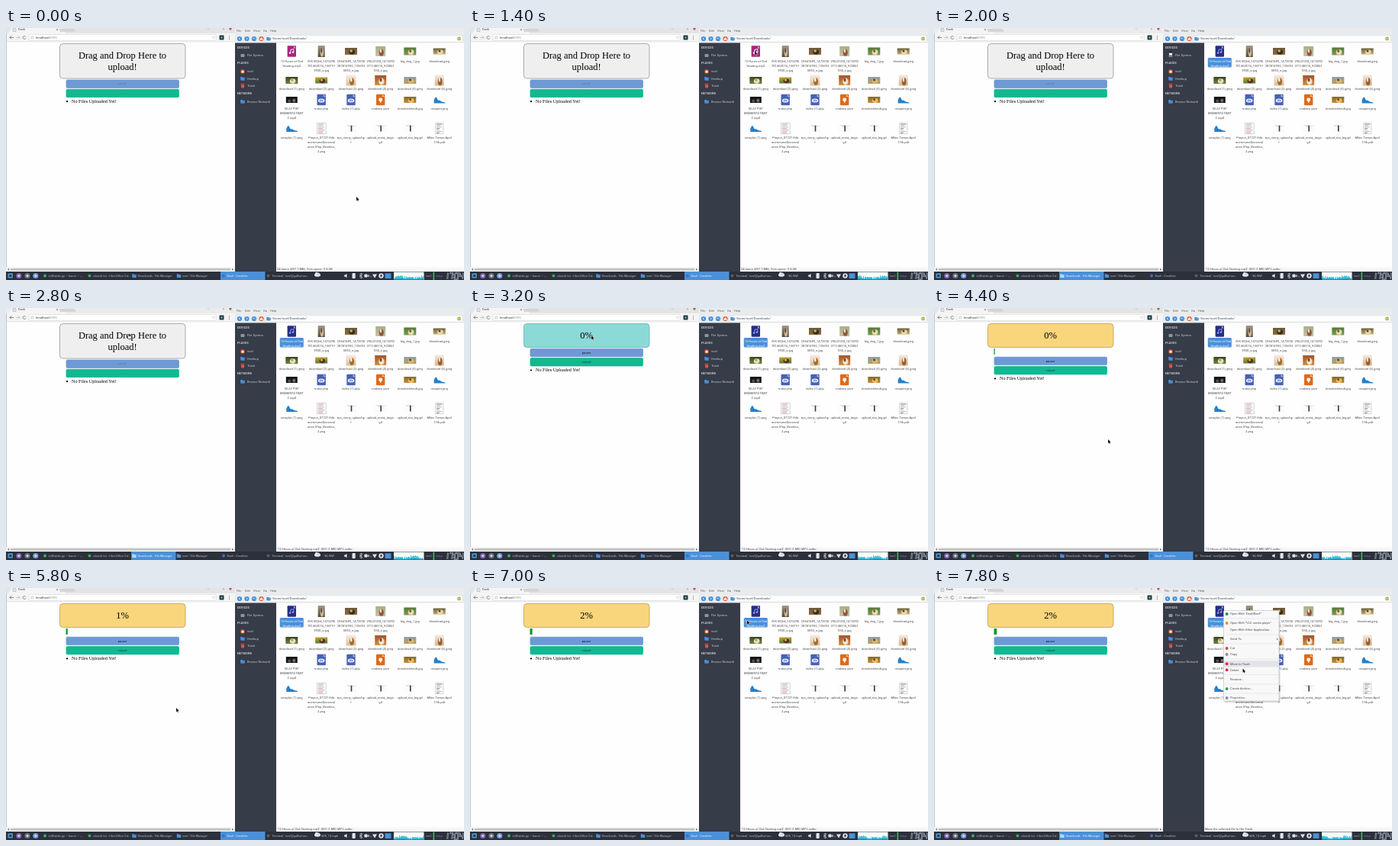
An HTML page with a canvas that plays this animation: 600x330 px, repeating every 8000 ms.

```html
<!DOCTYPE html>
<html lang="en">
<head>
<meta charset="utf-8">
<title>Drag and drop upload</title>
<style>
html, body { margin: 0; width: 100%; height: 100%; overflow: hidden; background: #fefefe; }
canvas { display: block; width: 600px; height: 330px; }
</style>
</head>
<body>
<canvas id="stage" width="600" height="330"></canvas>
<script>
const ctx = document.getElementById('stage').getContext('2d');
const LOOP = 8000;
const UI = 'Roboto, sans-serif', SERIF = '"Liberation Serif", serif', ARIAL = '"Liberation Sans", sans-serif';
const USER = 'noel', SONG = '12 Hours of Owl Hooting.mp3';

// Moments of the story, in ms
const SELECT = 1500, DROP = 3000, UPLOAD = 3500, MENU = 7300, HOVER = 7600;
const CURSOR = [
  [0, 459, 221], [200, 459, 221], [1200, 373, 30], [1600, 373, 30], [2700, 162, 36],
  [3000, 159, 36], [3300, 159, 36], [4200, 228, 172], [5000, 228, 172], [5700, 223, 157],
  [6200, 223, 157], [7200, 379, 29], [7400, 379, 29], [7800, 404.5, 105.5], [8000, 404.5, 105.5]
];

function box(x, y, w, h, fill, radius = 0, stroke) {
  ctx.beginPath();
  ctx.roundRect(x, y, w, h, radius);
  if (fill) { ctx.fillStyle = fill; ctx.fill(); }
  if (stroke) { ctx.strokeStyle = stroke; ctx.lineWidth = 0.7; ctx.stroke(); }
}
function oval(x, y, rx, ry, fill) {
  ctx.fillStyle = fill;
  ctx.beginPath();
  ctx.ellipse(x, y, rx, ry, 0, 0, 7);
  ctx.fill();
}
const dot = (x, y, r, fill) => oval(x, y, r, r, fill);
function shape(points, fill) {
  ctx.fillStyle = fill;
  ctx.beginPath();
  points.forEach(([x, y]) => ctx.lineTo(x, y));
  ctx.fill();
}
function line(points, color, width = 0.7) {
  ctx.strokeStyle = color;
  ctx.lineWidth = width;
  ctx.beginPath();
  points.forEach(([x, y]) => ctx.lineTo(x, y));
  ctx.stroke();
}
function folder(x, y, color = '#4a90d9') {
  box(x - 2.7, y - 2.3, 2.6, 2, color, 0.5);
  box(x - 2.7, y - 1.6, 5.4, 4, color, 0.6);
}
// y is the visual middle of the line
function text(string, x, y, color, size = 4.1, align = 'left', font = UI, weight = '') {
  ctx.font = `${weight} ${size}px ${font}`;
  ctx.textAlign = align;
  ctx.fillStyle = color;
  ctx.fillText(string, x, y + size * 0.34);
}
const noise = n => { const v = Math.sin(n * 127.1 + 3) * 43758.5; return v - Math.floor(v); };

function cursorAt(t) {
  const i = CURSOR.findIndex(k => k[0] > t);
  const [t0, x0, y0] = CURSOR[i - 1], [t1, x1, y1] = CURSOR[i];
  const p = (t - t0) / (t1 - t0), e = p * p * (3 - 2 * p);
  return [x0 + (x1 - x0) * e, y0 + (y1 - y0) * e];
}

/* ---------- browser ---------- */
function drawBrowser(t, focused) {
  box(0, 0, 300, 319, '#fefefe');
  box(0, 0, 300, 7, focused ? '#e2e4e6' : '#e9ebec');
  shape([[3, 7], [7, 0], [74, 0], [78, 7]], '#f4f4f4');
  shape([[71, 5], [69, 1], [89, 1], [92, 5]], '#d2d4d6');
  box(9, 0.5, 4, 4, '#e4e7ea', 0.5, '#a8b0b8');
  text('Dash', 16, 2, '#444');
  text('×', 67, 2, '#666', 5, 'center');
  text('–', 265, 1.5, '#999', 5, 'center');
  text('×', 285, 1.5, '#999', 5, 'center');
  dot(294, 1, 1.7, '#cc575d');
  box(0, 7, 300, 11, '#f4f4f4');
  line([[0, 18], [300, 18]], '#dcdcdc');
  line([[10, 12.5], [5, 12.5], [7, 10.5], [5, 12.5], [7, 14.5]], '#666');
  line([[13, 12.5], [18, 12.5], [16, 10.5], [18, 12.5], [16, 14.5]], '#bbb');
  ctx.beginPath(); ctx.arc(24, 12.5, 2, 0.4, 5.6); ctx.strokeStyle = '#666'; ctx.stroke();
  box(30, 8.5, 245, 8, '#fff', 1, '#dedede');
  ctx.beginPath(); ctx.arc(34.5, 12.5, 1.6, 0, 7); ctx.strokeStyle = '#888'; ctx.lineWidth = 0.5; ctx.stroke();
  text('localhost', 39, 12.5, '#333', 4.3);
  text(':8050', 56, 12.5, '#999', 4.3);
  text('☆', 272, 12.5, '#777', 5, 'center');
  box(279.5, 9.5, 6, 6, '#223642', 1);
  dot(282.5, 12.5, 1.3, '#69b5ad');
  for (const y of [10.5, 12.5, 14.5]) dot(292.5, y, 0.6, '#666');
  drawUploader(t);
  line([[0.3, 7], [0.3, 318]], '#8c8f94', 0.6);
  box(0, 313.5, 300, 5.5, '#f1f1f1');
  box(6, 314.8, 288, 2.6, '#c1c1c1');
  shape([[2, 316], [4, 314.6], [4, 317.4]], '#777');
  shape([[298, 316], [296, 314.6], [296, 317.4]], '#777');
}

function button(y, label, fill, border, color) {
  box(79, y, 147.5, 10.4, fill, 1.5, border);
  text(label, 152.5, y + 4.9, color, 4.2, 'center', ARIAL);
}

function drawUploader(t) {
  const started = t >= DROP, running = t >= UPLOAD;
  const percent = (t - 2700) / 2000;
  const title = (s, y) => text(s, 152.5, y, '#000', 12.5, 'center', SERIF);
  if (!started) {
    box(70.5, 20.5, 164.5, 45.6, '#efefef', 4, '#8a8a8a');
    title('Drag and Drop Here to', 36);
    title('upload!', 50.6);
  } else {
    box(70.5, 20.5, 164.5, 31, running ? '#f9d57c' : '#8bdad8', 4, running ? '#b69245' : '#5aa9a6');
    title((running ? Math.floor(percent) : 0) + '%', 36);
  }
  if (running) box(78.5, 53, percent * 1.48, 8, '#119a20');
  const top = running ? 64.2 : started ? 53.3 : 68;
  button(top, 'pause', '#6d9ad6', '#638fca', started ? '#111' : '#6c7480');
  button(top + 12.3, 'cancel', '#11b991', '#10b08a', started ? '#0a4034' : '#18a884');
  dot(80, top + 28.2, 1.1, '#000');
  text('No Files Uploaded Yet!', 86, top + 27.9, '#000', 6.2, 'left', SERIF);
}

/* ---------- file manager ---------- */
const COLUMNS = [374.3, 413.2, 452, 490.7, 529.3, 567.7];
const ROWS = [[30.5, 43.3], [68.5, 80], [94, 106], [131.5, 143.8]];
const photo = (w, h, back, low, coat, mark) => (x, y) => {
  const g = ctx.createLinearGradient(0, y - h / 2, 0, y + h / 2);
  g.addColorStop(0, back); g.addColorStop(1, low);
  box(x - w / 2, y - h / 2, w, h, g);
  oval(x + w * 0.08, y + h * 0.12, w * 0.24, h * 0.36, coat);
  if (mark) oval(x + w * 0.02, y - h * 0.05, w * 0.1, h * 0.2, mark);
};
const page = (fill, mark) => (x, y, selected) => {
  box(x - 5.7, y - 7.2, 11.4, 14.4, selected ? '#232d83' : fill, 1);
  shape([[x + 2.5, y - 7.2], [x + 5.7, y - 4], [x + 2.5, y - 4]], '#ffffff88');
  if (mark === 'note') {
    const ink = selected ? '#8d9be0' : '#f7e3f0';
    line([[x - 1.5, y + 2], [x - 1.5, y - 2], [x + 2.5, y - 3], [x + 2.5, y + 1]], ink, 1);
    dot(x - 2.3, y + 2.2, 1.3, ink);
    dot(x + 1.7, y + 1.2, 1.3, ink);
  } else if (mark === 'oval') {
    oval(x, y + 1, 4.3, 2.6, '#eef1fc');
    text('php', x, y + 0.8, fill, 2.8, 'center', UI, 'bold');
  } else {
    dot(x, y, 2.4, '#fff');
    shape([[x - 1.5, y + 1], [x + 1.5, y + 1], [x, y + 4.5]], '#fff');
  }
};
const plot = (x, y) => shape([[x - 7, y + 4.5], [x - 7, y], [x - 5, y - 3.5], [x - 3.5, y - 3],
  [x - 2, y + 0.5], [x + 1, y + 1], [x + 3, y + 2.5], [x + 7.5, y + 3.2], [x + 7.5, y + 4.5]], '#2080cc');
const sheet = (w, seed, accent) => (x, y) => {
  box(x - w / 2, y - 7.3, w, 14.6, '#fafafa', 0, '#c9c9c9');
  for (let i = 0; i < 7; i++)
    line([[x - w / 2 + 1.5, y - 5.5 + i * 1.9], [x + (noise(i + seed) - 0.1) * (w / 2 - 1), y - 5.5 + i * 1.9]],
      i % 3 ? '#a8a8a8' : accent, 0.7);
};
const capture = (x, y) => {
  box(x - 8, y - 5, 16, 10, '#fbfbfb');
  box(x - 0.3, y - 4, 1.6, 8, '#343944');
  line([[x - 5, y - 3.5], [x - 0.5, y - 3.5]], '#aaa');
  line([[x + 2, y - 3], [x + 6, y - 3]], '#d5d5d5');
};
const video = (x, y) => {
  box(x - 7.5, y - 4, 15, 8, '#14161a');
  oval(x - 3, y + 1.5, 2, 2, '#5b5550');
  oval(x + 3, y + 1, 2, 2.3, '#77706a');
};
const FILES = [
  [
    ['12 Hours of Owl|Hooting.mp3', page('#a3277f', 'note')],
    ['29518264_1473290|781462574_168151|9558_o.jpg', photo(9, 15, '#a39a86', '#5a4634', '#c9b79d', '#4c3b2c')],
    ['29641809_1473290|387814993_125693|0853_o.jpg', photo(16, 9, '#6d5a38', '#8d6c3d', '#3d2f22', '#cfb68e')],
    ['29623148_1473290|371148310_922861|554_o.jpg', photo(13, 13, '#a8b183', '#c7bfae', '#8a5c38', '#e8dcc6')],
    ['big_dog_1.jpg', photo(16, 10, '#4f7b38', '#7d9b4a', '#e6d9bd', '#8a5a30')],
    ['download.jpeg', photo(16, 8, '#6d6236', '#c2aa6c', '#e7d8b0', '#5c4a2c')]
  ],
  [
    ['download (1).jpeg', photo(16, 9, '#35461f', '#73803c', '#e4ded0', '#c49a45')],
    ['download (2).jpeg', photo(16, 8, '#c2a03c', '#5f7a2c', '#4c3a22', '#e0a94d')],
    ['download (3).jpeg', photo(13, 14, '#f3ede2', '#d8bf9a', '#a86c37', '#fff4e4')],
    ['download (4).jpeg', photo(15, 13, '#a4532b', '#d28f4a', '#efe3d3', '#8a4524')],
    ['download (5).jpeg', photo(16, 9, '#8ba3ad', '#b79a58', '#e0b66a', '#5f5135')],
    ['download (6).jpeg', photo(12, 14, '#f2ece4', '#d6b48c', '#9c5e30', '#f5e6d2')]
  ],
  [
    ['SILLY PUP|MOMENTS PART|2.mp4', video],
    ['index.php', page('#4762b5', 'oval')],
    ['index (1).php', page('#4762b5', 'oval')],
    ['makaro.yarn', page('#dd6b1e', 'bulb')],
    ['maxresdefault.jpg', photo(16, 8, '#8b6a24', '#c08c36', '#e3c16b', '#6a4a1e')],
    ['newplot.png', plot]
  ],
  [
    ['newplot (1).png', plot],
    ['Project_07737.Edit|animmuneDeconvol|ution IPop_Besidea_|2.png', sheet(12, 1, '#c9707a')],
    ['too_many_upload.gi|f', capture],
    ['upload_many_dogs.|gif', capture],
    ['upload_too_big.gif', capture],
    ['Miles Tavern-April|17th.pdf', sheet(10.5, 9, '#555')]
  ]
];

function drawFiles(selected) {
  FILES.forEach((row, r) => row.forEach(([label, icon], c) => {
    const x = COLUMNS[c], [iconY, labelY] = ROWS[r];
    const chosen = selected && !r && !c;
    icon(x, iconY, chosen);
    if (chosen) box(x - 15.5, 39, 31, 12.5, '#4a90d9', 1.5);
    label.split('|').forEach((s, i) =>
      text(s, x, labelY + i * 6, chosen ? '#fff' : '#4a4d52', 4.1, 'center'));
  }));
}

function drawFileManager(t) {
  const selected = t >= SELECT;
  box(300, 0, 300, 20, '#eaebed');
  box(354, 19.5, 246, 299.5, '#fefefe');
  box(300, 19.5, 54, 299.5, '#363c48');
  [['File', 302], ['Edit', 313], ['View', 324], ['Go', 337], ['Help', 346]]
    .forEach(([s, x]) => text(s, x, 4, '#5c616c'));
  [['#3f8fd8', 306], ['#3f8fd8', 315.5], ['#3f8fd8', 325], ['#e2572f', 334.5]]
    .forEach(([color, x]) => dot(x, 14, 3.1, color));
  line([[307, 12.3], [305, 14], [307, 15.7]], '#fff');
  line([[314.5, 12.3], [316.5, 14], [314.5, 15.7]], '#fff');
  line([[323.3, 14.7], [325, 12.7], [326.7, 14.7]], '#fff');
  shape([[332.7, 14], [334.5, 12], [336.3, 14], [336.3, 16], [332.7, 16]], '#fff');
  box(340, 9.8, 258.5, 8.5, '#fdfdfd', 1, '#d9dce1');
  folder(344, 14);
  text(`/home/${USER}/Downloads/`, 348, 14, '#4a4d52', 4.2);
  dot(593.5, 14, 2.4, '#9bb83a');
  line([[592.3, 14], [594.7, 14]], '#fff');

  [['DEVICES', 26], ['PLACES', 46], ['NETWORK', 86]]
    .forEach(([s, y]) => text(s, 303, y, '#c3c8d1', 4, 'left', UI, 'bold'));
  [['File System', 36], [USER, 57], ['Desktop', 66.3], ['Trash', 75.5], ['Browse Network', 96.3]]
    .forEach(([s, y]) => text(s, 316, y, '#c3c8d1'));
  box(307.5, 34, 5, 4, '#8a95a5', 0.7);
  dot(310, 57, 2.8, '#e2572f');
  shape([[308.4, 57], [310, 55.3], [311.6, 57], [311.6, 58.6], [308.4, 58.6]], '#fff');
  folder(310, 66.3);
  box(308, 74, 4.2, 4.5, '#d8533f', 0.7);
  line([[307.5, 73.2], [312.7, 73.2]], '#d8533f', 0.8);
  folder(310, 96.3);

  drawFiles(selected);
  box(354, 313, 246, 6, '#f8f8f9');
  const status = t >= HOVER ? 'Move the selected file to the Trash'
    : selected ? `"${SONG}" (801.2 MB) MP3 audio` : '24 items (857.7 MB), Free space: 9.8 GB';
  text(status, 355, 316, '#4a4d52');
}

const MENU_ITEMS = [
  ['Open With "DeaDBeeF"', 34, '#3c8b3a'], ['Open With "VLC media player"', 46, '#ef8a1d'],
  ['Open With Other Application...', 54.5], ['Send To', 67], ['Cut', 79, '#d0484a'],
  ['Copy', 87, '#8a8f98'], ['Move to Trash', 99.3, '#d8334c'], ['Delete', 107.3, '#d8334c'],
  ['Rename...', 119.7], ['Create Archive...', 132, '#3b9a5a'], ['Properties...', 144, '#8a8f98']
];
function drawMenu(hover) {
  box(380.5, 31, 73, 119, '#00000026', 1);
  box(379.5, 29.5, 72.5, 118.5, '#f8f8f9', 1, '#c3c5c9');
  if (hover) box(380, 95.2, 71.5, 8.3, '#e3e4e7');
  for (const y of [40, 61, 73, 93, 113.5, 126, 138]) line([[381, y], [451, y]], '#dedfe2', 0.6);
  for (const [label, y, color] of MENU_ITEMS) {
    if (color) dot(383.6, y, 2, color);
    text(label, 388, y, '#4a4d52');
  }
  shape([[449, 65.5], [450.5, 67], [449, 68.5]], '#666');
}

/* ---------- taskbar ---------- */
const TASKS = [
  ['callbacks.py — home — ~...', 47, '#45a56b'], ['clinical.tsv - LibreOffice Cal...', 105.5, '#3fa64b'],
  ['Downloads - File Manager', 164], [`${USER} - File Manager`, 222.5],
  ['Dash - Crestline', 281, '#3d6fc4'], [`Terminal - ${USER}@galliumos...`, 339.5, '#555d6b']
];
const INK = '#e2e5ea';
function drawTaskbar(t, focused) {
  box(0, 319, 600, 11, '#2b303b');
  box(2.5, 321.2, 6.4, 6.4, '#4f93c8', 0.8);
  box(4.2, 322.9, 3, 3, '#24435c', 0.5);
  [['#8066b4', 16.8], ['#6d7380', 28], ['#6f9cd6', 38.8]].forEach(([color, x]) => {
    dot(x, 324.5, 3.6, color);
    dot(x, 324.5, 1.5, '#d5dfe9');
  });
  TASKS.forEach(([label, x, color], i) => {
    const active = i === (focused ? 4 : 2);
    if (active) box(x, 319, 58.5, 11, '#4a90d9');
    if (color) dot(x + 4, 324.5, 2, color);
    else folder(x + 4, 324.5, active ? '#b9d6f3' : '#4a90d9');
    text(label, x + 8.5, 324.5, active ? '#eef4fb' : '#b4b9c2', 3.9);
  });

  box(402, 319, 44, 11, '#2b303b');
  oval(408, 323.5, 4, 2.2, '#e8e8e8');
  dot(407, 322, 2.2, '#e8e8e8');
  dot(409.5, 322.3, 1.7, '#cfd3d8');
  if (t >= 900) text(t < 5200 ? '90, NW' : '60S, 12 mph', t < 5200 ? 417 : 413, 324.5, '#c3c8d1', 4);

  shape([[443, 323.5], [444.5, 323.5], [446.5, 321.7], [446.5, 327.3], [444.5, 325.5], [443, 325.5]], INK);
  box(453.5, 321, 4.2, 7, INK, 1);
  line([[463, 323], [467, 326.5], [465, 328], [465, 321], [467, 322.7], [463, 326]], INK);
  box(469.5, 322.5, 4, 4, INK, 0.7);
  shape([[473.5, 324.5], [475.5, 322.7], [475.5, 326.4]], INK);
  dot(478, 325.5, 1, '#d24b4b');
  shape([[480, 322.5], [486, 322.5], [483, 327.5]], INK);
  dot(491.5, 324.5, 3.2, INK);
  box(490.6, 322.8, 1.8, 3.4, '#2b303b', 0.4);
  box(496.5, 321.2, 8, 6.8, '#4a90d9', 0.8);

  drawLoadGraph(t);
  text(USER, 549.5, 324.5, '#9aa1ad', 4.2);
  box(559.5, 319.5, 1.7, 10.5, '#2fc25e');
  text('setup', 563, 324.5, '#7f8794', 3.5);
  drawClock();
}
function drawLoadGraph(t) {
  box(508, 319.5, 39.5, 10.5, '#fafcfc');
  const step = Math.floor(t / 200);
  for (let i = 0; i < 39; i++) {
    const n = i + step;
    const h = 1.5 + 3 * noise(n) + 2 * Math.max(0, Math.sin(n / 5));
    box(508 + i, 330 - h, 1.05, h, '#3cc4d8');
    box(508 + i, 330 - h * 0.35, 1.05, h * 0.35, '#2b86c4');
  }
}
// Outlined, slanted segment digits for 17:04
const DIGITS = [
  [575, [[4, 0], [4, 8]]], [581, [[0, 0], [4, 0], [4, 8]]],
  [588.5, [[0, 0], [4, 0], [4, 8], [0, 8], [0, 0]]], [595, [[0, 0], [0, 4], [4, 4], [4, 0], [4, 8]]]
];
function drawClock() {
  for (const [left, points] of DIGITS) {
    const path = points.map(([x, y]) => [left + x - y * 0.1, 320.7 + y]);
    line(path, '#a9b3c1', 1.9);
    line(path, '#3a4250', 0.7);
  }
  dot(586.6, 323, 0.7, '#a9b3c1');
  dot(586.2, 326.5, 0.7, '#a9b3c1');
}

function drawCursor(t) {
  const [x, y] = cursorAt(t);
  if (t > 1650 && t < DROP) {
    box(x - 1.8, y + 0.5, 5, 4, '#fff', 1.2, '#111');
    line([[x - 0.2, y + 0.5], [x - 0.2, y - 1.3], [x + 1.5, y - 1.3], [x + 1.5, y + 0.5]], '#111');
    return;
  }
  const arrow = [[0, 0], [0, 5.2], [1.2, 4.2], [2, 6], [2.9, 5.6], [2.1, 3.9], [3.7, 3.8], [0, 0]]
    .map(([dx, dy]) => [x + dx, y + dy]);
  line(arrow, '#fff', 0.9);
  shape(arrow, '#111');
}

function draw(t) {
  const focused = t < SELECT || (t >= DROP && t < MENU);
  ctx.clearRect(0, 0, 600, 330);
  drawBrowser(t, focused);
  drawFileManager(t);
  if (t >= MENU) drawMenu(t >= HOVER);
  drawTaskbar(t, focused);
  drawCursor(t);
}

const start = performance.now();
function tick() {
  draw((performance.now() - start) % LOOP);
  requestAnimationFrame(tick);
}
tick();
</script>
</body>
</html>
```
